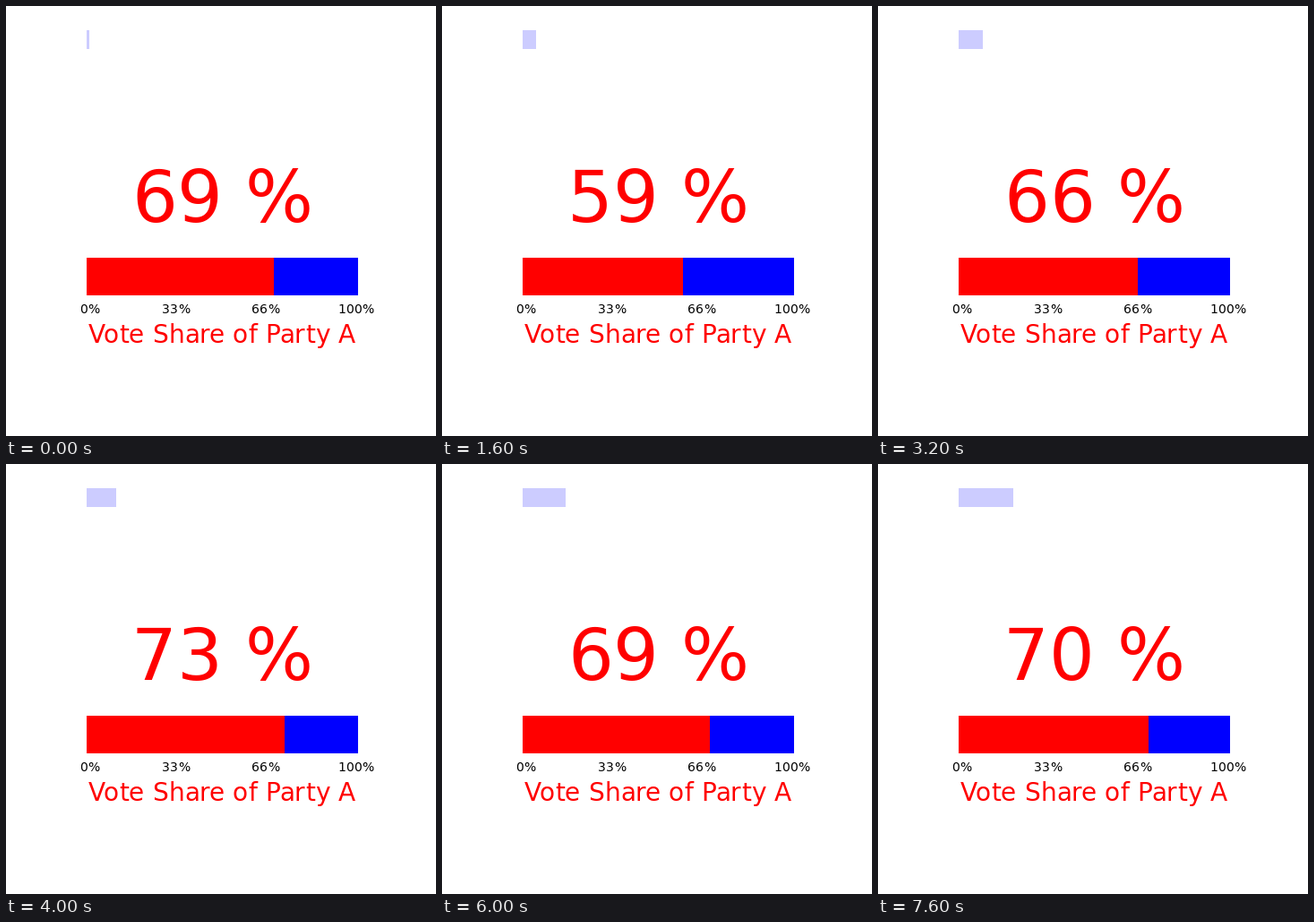
Recreate the animation shown at these times as a matplotlib script. Size 480 px wide and 480 px high, loop 8000 ms.

```python
import matplotlib.pyplot as plt
from matplotlib.animation import FuncAnimation
from matplotlib.patches import Rectangle
from matplotlib.textpath import TextPath

SIZE, DPI = 480, 80
INTERVAL = 400
LEFT, STEP = 89.92, 3.03  # start of the bars and pixels per percent
SHARES = [69, 65, 75, 69, 59, 74, 67, 63, 66, 64,
          73, 72, 68, 74, 69, 69, 74, 68, 65, 70]

plt.rcParams["font.family"] = "DejaVu Sans"
fig = plt.figure(figsize=(SIZE / DPI, SIZE / DPI), dpi=DPI, facecolor="white")
ax = fig.add_axes([0, 0, 1, 1])
ax.set_xlim(0, SIZE)
ax.set_ylim(SIZE, 0)
ax.axis("off")


def edge(percent):
    return round(LEFT + STEP * percent)


def bar(top, bottom, color, percent=0):
    x = edge(0)
    rect = Rectangle((x, top), edge(percent) - x, bottom - top,
                     facecolor=color, linewidth=0, antialiased=False)
    return ax.add_patch(rect)


def advance(text, pixels):
    def width(s):
        return TextPath((0, 0), s, size=pixels).get_extents().width
    return width(f"|{text}|") - width("||")


def label(x, baseline, text, pixels, color):
    """Set the glyphs one by one, with advances and kerning in whole pixels."""
    glyphs = []
    for char, following in zip(text, text[1:] + "|"):
        glyphs.append(ax.text(x, baseline, char, fontsize=pixels * 72 / DPI,
                              color=color, ha="left", va="baseline"))
        own = advance(char, pixels)
        kern = advance(char + following, pixels) - own - advance(following, pixels)
        x += round(own) + round(kern)
    return glyphs


progress = bar(27, 48, "#ccccff")
bar(281, 323, "blue", 100)
share_bar = bar(281, 323, "red")
digits = label(140, 241, "00 %", 80, "red")[:2]

for x, tick in ((82, "0%"), (174, "33%"), (274, "66%"), (370, "100%")):
    label(x, 343, tick, 14, "black")
label(92, 376, "Vote Share of Party A", 28, "red")


def update(i):
    share = SHARES[i]
    progress.set_width(edge(i + 1) - edge(0))
    share_bar.set_width(edge(share) - edge(0))
    for glyph, digit in zip(digits, str(share)):
        glyph.set_text(digit)
    return progress, share_bar, *digits


anim = FuncAnimation(fig, update, frames=len(SHARES), interval=INTERVAL,
                     repeat=True, repeat_delay=0)
plt.show()
```
